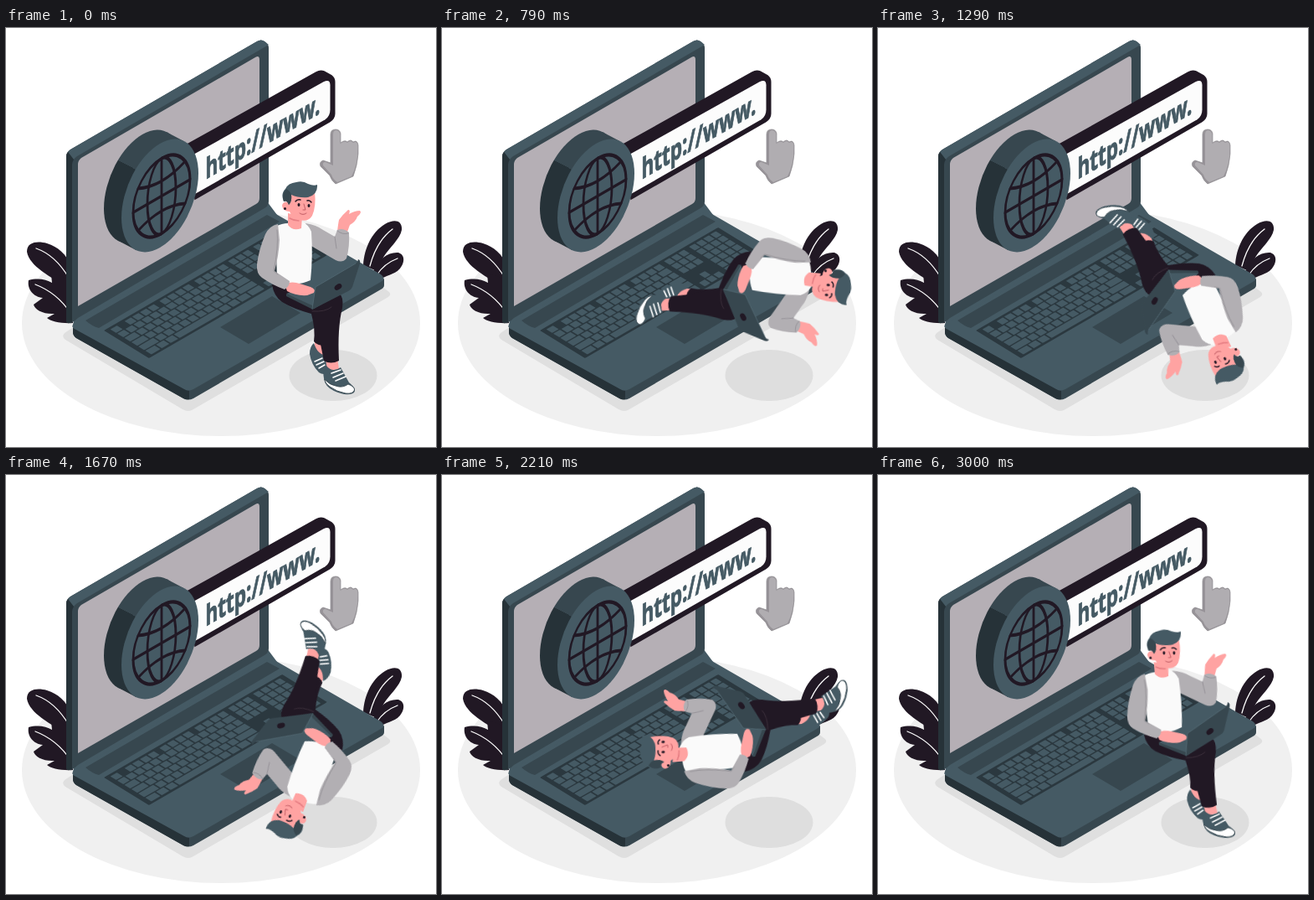
These frames come from a looping animation (514x500 px, 3.04 s). An HTML page:

```html
<!DOCTYPE html>
<html lang="en">
<head>
<meta charset="utf-8">
<title>Web address</title>
<style>
  html, body { margin: 0; width: 100%; height: 100%; overflow: hidden; background: #fff; }
  svg { display: block; width: 514px; height: 500px; }
  #man { transform-origin: 362px 310px; }
  .ink { fill: #211824; }
  .slate { fill: #455a64; }
  .deep { fill: #37474f; }
  .dark { fill: #263238; }
  .skin { fill: #ffa3a2; }
  .grey { fill: #b2afb3; }
  .line { fill: none; stroke-linecap: round; stroke-linejoin: round; }
  .url { font: 700 26px "Open Sans", "Noto Sans", sans-serif; stroke: #455a64; stroke-width: .8; }
</style>
</head>
<body>
<svg viewBox="0 0 514 500">
  <defs>
    <linearGradient id="rim" gradientUnits="userSpaceOnUse" x1="-29" y1="35.600" x2="29" y2="-35.600">
      <stop offset=".6" stop-color="#263238"/>
      <stop offset=".6" stop-color="#37474f"/>
    </linearGradient>
  </defs>
  <ellipse cx="257" cy="352" rx="238" ry="135" fill="#f0f0f0"/>
  <path d="M70 364L82 356L218 440L446 306L458 315Q461 318 457 321L224 455Q218 459 211 455L71 372Q66 368 70 364Z" fill="#dfdfdf"/>
  <ellipse cx="391" cy="414.500" rx="52.500" ry="30.500" fill="#dedede"/>

  <g id="plants">
    <path class="ink" d="M76 310C52 297 28 284 25 267C25 255 38 254 49 257C62 261 72 270 78 284Z"/>
    <path class="ink" d="M80 352C67 353 53 350 49 346L58 341C45 342 34 336 33 330L44 322C33 321 25 312 27 301C38 298 48 300 55 304L54 294C66 293 76 300 80 312Z"/>
    <path class="ink" d="M427 283C428 262 438 243 453 234C465 227 474 230 473 241C470 256 452 264 443 290Z"/>
    <path class="ink" d="M439 291C444 276 457 267 469 268C478 271 476 281 471 287C464 295 453 295 446 301Z"/>
    <path class="line" d="M36 263Q59 271 75 298M35 306Q61 316 77 340M462 240Q443 254 435 284M468 275Q452 281 443 295" stroke="#fff" stroke-width="1.300"/>
  </g>

  <g id="laptop">
    <path class="slate" d="M79 357L84 340L312 207L324 223Z"/>
    <path class="deep" d="M80 357L218 430L452 299V307Q452 310 448 312L224 442Q218 445 212 442L84 370Q80 367 80 363Z"/>
    <path class="slate" d="M80 357Q80 353 84 351L310 221Q315 218 321 221L448 294Q455 299 448 303L224 431Q218 434 212 431L84 361Q80 359 80 357Z"/>
    <path class="dark" d="M80 358L213 431Q216 433 219 433V443Q215 444 212 442L84 370Q80 367 80 363Z"/>
    <path class="deep" d="M95 349L312 223L327 231L111 358Q103 356 95 349Z"/>
    <path class="deep" d="M256 357L318 320L352 340L290 377Z"/>
    <g id="keys" transform="matrix(2.130 -1.230 .540 .330 117 361)">
      <rect width="100" height="100" rx="1" fill="#2b383f"/>
    </g>
    <path class="deep" d="M72 349V154Q72 148 77 145L300 16Q305 13 309 16Q314 19 314 24V207Q314 212 309 215L86 346Q80 352 76 352Q72 352 72 349Z"/>
    <path class="slate" d="M74 148L77 145L300 16Q305 13 309 16L314 20L85 153Q82 155 81 157Z"/>
    <path class="dark" d="M72 154Q72 150 74 148L81 157Q79 160 79 163V351Q72 354 72 349Z"/>
    <path d="M86 163Q86 158 90 155L298 35Q303 32 303 38V203Q303 208 299 210L86 332Z" fill="#b5afb5"/>
  </g>

  <g id="bar" transform="translate(-.5 -.7)">
    <path class="ink" d="M215 140L371 53Q376 50 381 52L390 57Q394 60 394 65V103Q394 109 388 113L226 206Z"/>
    <path d="M215 157L380 65Q388 61 388 69V98Q388 106 382 110L226 199Z" fill="#fcfcfc"/>
    <text class="url slate" transform="matrix(.866 -.500 0 1.300 239 181.500)">http://www.</text>
  </g>

  <g id="globe">
    <g transform="matrix(1 -.576 0 1.350 163 189)" fill="url(#rim)">
      <circle r="46"/>
      <path d="M29-35.600L50-18.500L-8 52.700L-29 35.600Z"/>
    </g>
    <circle class="slate" r="46" transform="matrix(1 -.576 0 1.350 184 200)"/>
    <g class="line" transform="matrix(1 -.576 0 1.320 186 200.500)" stroke="#211824" stroke-width="2.800">
      <circle r="34"/>
      <ellipse rx="17" ry="34"/>
      <path d="M0-34V34M-34 0H34M-28-19Q0-8 28-19M-28 19Q0 8 28 19"/>
    </g>
  </g>

  <g id="pointer" stroke="#8f8b90" stroke-width=".7">
    <path d="M388 127Q388 121 394 121Q399 121 400 126V137Q405 133 408 136Q412 132 415 136Q420 133 421 140V150Q420 164 415 177L394 186Q389 182 387 176L376 165Q374 160 379 158L388 161Z" fill="#979398"/>
    <path d="M391 127Q391 122 395 122Q399 123 399.500 127V138Q405 134 408 137Q412 133 415 137Q420 134 420.500 141Q421 163 413 177L396 184Q391 181 389 175L379 164Q378 160 382 160L391 164Z" fill="#b0adb1" stroke="none"/>
  </g>

  <g id="man">
    <path class="skin" d="M369 366L381 374L382 391L369 389Z"/>
    <path class="slate" d="M368 376Q363 380 363 389Q365 402 374 411Q380 415 385 411L383 390Q373 391 368 376Z"/>
    <path class="line" d="M369 398L378 394M371 402L380 398M374 406L381 402" stroke="#fff" stroke-width="1.500"/>
    <path class="ink" d="M318 306Q320 320 330 327Q343 335 365 341Q370 360 368 374Q374 381 383 377L388 360L400 328Z"/>
    <path class="skin" d="M382 394L396 393L398 407L384 409Z"/>
    <path class="ink" d="M338 310Q370 305 397 316Q404 320 402 334Q396 358 398 397Q388 402 380 397Q377 379 371 360L366 339Q345 334 332 326Z"/>
    <path class="line" d="M366 338Q382 339 389 333" stroke="#40343f" stroke-width=".8"/>
    <path class="slate" d="M383 403Q378 409 380 418Q381 428 392 433Q402 438 411 437Q418 436 417 431Q416 428 410 423L400 405Q390 412 383 403Z"/>
    <path d="M394 427Q402 430 409 425Q417 428 416.500 432Q415 437 406 436Q395 434 387 428Q382 425 380.500 419Q387 426 394 427Z" fill="#fff" stroke="#37474f" stroke-width=".9"/>
    <path class="line" d="M389 412L400 408M391 417L403 412M394 421L406 416" stroke="#fff" stroke-width="1.600"/>

    <path class="skin" d="M396 243Q397 234 398 229Q402 223 409 217Q412 217 410 222Q417 218 423 218Q426 220 420 225Q418 231 411 235L407 246Z"/>
    <path class="grey" d="M358 233Q371 235 379 241L393 249L396 241Q403 238 410 244Q411 261 407 275Q402 281 394 277L363 259Z"/>
    <path class="line" d="M393 249L395 263M396 242Q402 247 409 245" stroke="#908c92" stroke-width=".8"/>
    <path d="M322 237Q330 233 337 233L354 231Q362 235 365 243Q367 272 364 301Q345 310 324 300Z" fill="#fafafa"/>
    <path class="skin" d="M337 221L337 235Q343 243 353 239L354 225Z"/>
    <path class="skin" d="M336 200L369 195Q371 213 366 224Q361 232 351 229Q342 227 339 219Q331 219 330 212Q331 206 338 208Z"/>
    <path class="slate" d="M338 211Q336 205 332 207Q328 198 334 192Q337 185 347 184Q355 182 361 186Q368 189 372 187Q373 199 361 202Q350 203 341 199Q342 207 338 211Z"/>
    <path class="deep" d="M338 211Q336 205 332 207Q329 199 335 192Q340 195 341 199Q342 207 338 211Z"/>
    <g class="ink">
      <ellipse cx="350" cy="211" rx="1.500" ry="2"/>
      <ellipse cx="362" cy="212" rx="1.500" ry="2"/>
      <circle cx="333.500" cy="215.500" r="1.500"/>
    </g>
    <path class="line" d="M346 207Q348 204 352 205M360 206Q363 205 365 208" stroke="#211824" stroke-width="1.400"/>
    <path class="line" d="M356 210L358 217L355 217M351 221Q355 224 359 221" stroke="#c25e66" stroke-width="1"/>
    <path class="line" d="M339 227Q344 230 350 230" stroke="#e77f84" stroke-width="1.500"/>

    <path class="slate" d="M335 317L369 304L411 310L368 335Z"/>
    <path class="deep" d="M335 317L368 332L367 336L335 320Z"/>
    <path class="skin" d="M333 305Q343 302 351 305L364 309Q371 312 368 316L360 319Q347 320 336 314Z"/>
    <path class="grey" d="M325 234Q315 236 310 246Q302 265 300 282Q299 293 306 298Q319 307 333 312Q339 308 339 302L321 290Q326 272 327 253Z"/>
    <path class="line" d="M324 241Q326 262 320 290L325 294" stroke="#918e94" stroke-width=".8"/>
    <path class="deep" d="M370 309L418 281Q421 279 421 276Q424 277 423 281L414 309Q413 312 409 314L366 336Z"/>
    <path class="line" d="M366 335L370 309L418 281" stroke="#546a74" stroke-width=".8"/>
    <ellipse class="ink" cx="397" cy="309" rx="4.800" ry="3.200" transform="rotate(-35 397 309)"/>
  </g>
</svg>
<script>
  const NS = "http://www.w3.org/2000/svg";
  const board = document.getElementById("keys");

  function key(x, y, w, h) {
    const r = document.createElementNS(NS, "rect");
    const box = { x: x + .4, y: y + 1.2, width: w - .8, height: h - 2.4, rx: .5, fill: "#455a64" };
    for (const name in box) r.setAttribute(name, box[name]);
    board.append(r);
  }

  function row(x, y, widths) {
    for (const w of widths) {
      key(x, y, w, 15.5);
      x += w;
    }
  }

  const same = (n, w) => Array(n).fill(w);
  const rows = [
    [4.5],
    [...same(13, 4.5), 5.9],
    [6.4, ...same(12, 4.5), 4],
    [7.4, ...same(11, 4.5), 7.5],
    [9.2, ...same(10, 4.5), 10.2],
    [6, 5, 5, 25, 5, 5, 6, 7.4]
  ];
  rows.forEach((widths, i) => {
    const y = 3.5 + i * 15.5;
    row(2, y, widths);
    if (i === 0) for (const x of [10, 29.5, 49]) row(x, y, same(4, 4.3));
    if (i < 3 || i === 5) row(68, y, same(3, 4));
    if (i === 4) row(72, y, [4]);
    row(82, y, same(4, 4));
  });

  // One turn in 73 held poses, slightly slower near the end.
  document.getElementById("man").animate([
    { transform: "rotate(0deg)", offset: 0, easing: "steps(53)" },
    { transform: "rotate(265deg)", offset: 53 / 73, easing: "steps(20)" },
    { transform: "rotate(360deg)", offset: 1 }
  ], { duration: 3040, delay: -5, iterations: Infinity });
</script>
</body>
</html>
```
